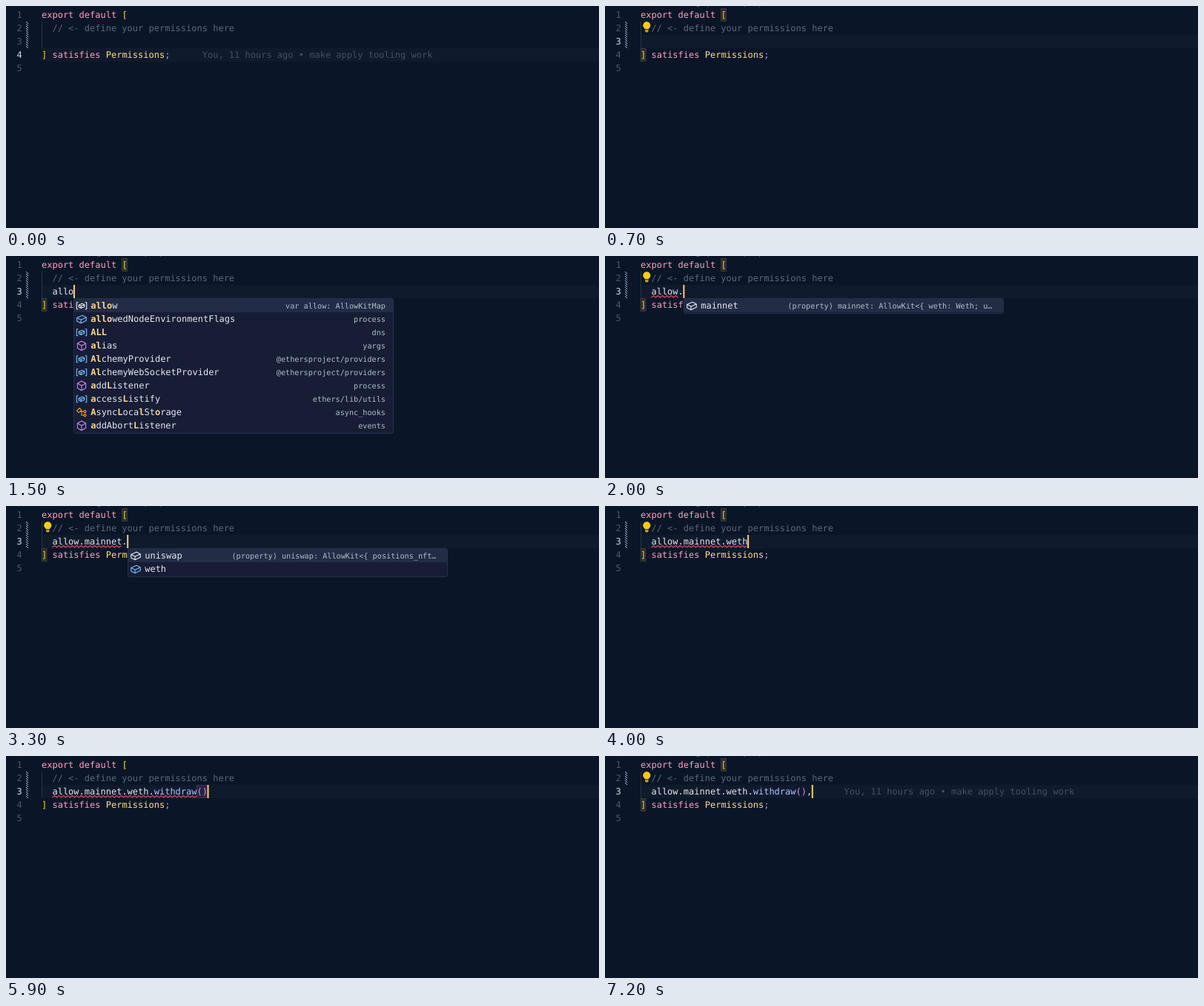
Recreate the animation shown at these times as an HTML page. Size 800 by 300 pixels, loop 7500 ms.

```html
<!DOCTYPE html>
<html lang="en">
<head>
<meta charset="utf-8">
<title>Typing permissions</title>
<style>
html, body { margin: 0; width: 100%; height: 100%; overflow: hidden; background: #0a1628; }
svg { display: block; width: 800px; height: 300px; }
text { font: 12px "DejaVu Sans Mono", Menlo, monospace; white-space: pre; text-rendering: geometricPrecision; }
.detail { font-size: 10.2px; fill: #b3bac8; }
.lens { font: 10.8px "Liberation Sans", Arial, sans-serif; fill: #5a6478; }
.hit { fill: #ffd58a; font-weight: bold; }
.icon { fill: none; stroke-width: 1.1; stroke-linejoin: round; }
</style>
</head>
<body>
<svg viewBox="0 0 800 300">
  <defs>
    <pattern id="hatch" width="3" height="3" patternUnits="userSpaceOnUse">
      <path d="M-1 -1L4 4M-1 2L1 4M2 -1L4 1" stroke="#a9c3e6" stroke-width="1"/>
    </pattern>
  </defs>
  <rect width="800" height="300" fill="#0a1628"/>
  <g id="view"></g>
</svg>
<script>
(() => {
const LOOP = 7500, CW = 7.224, LEFT = 48, INDENT = LEFT + 2 * CW, ROW = 18;
const PINK = '#ff9fbe', GOLD = '#ffd52e', TYPE = '#ffdd8c', PLAIN = '#e3e7ef',
      CALL = '#a9c5ff', PURPLE = '#cf8fe8', GREY = '#5d6678', DIM = '#454f61', ERR = '#e2455f';
const view = document.getElementById('view');

// Completion lists: [icon, label, detail]
const GLOBALS = [
  ['var', 'allow', 'var allow: AllowKitMap'],
  ['method', 'alias', 'yargs'],
  ['field', 'allowedNodeEnvironmentFlags', 'process'],
  ['var', 'AlchemyProvider', '@ethersproject/providers'],
  ['var', 'AlchemyWebSocketProvider', '@ethersproject/providers'],
  ['var', 'ALL', 'dns'],
  ['method', 'addListener', 'process'],
  ['var', 'accessListify', 'ethers/lib/utils'],
  ['class', 'AsyncLocalStorage', 'async_hooks'],
  ['method', 'addAbortListener', 'events'],
  ['method', 'addAbortListener', 'stream'],
  ['var', 'applyAnnotations', 'zodiac-roles-sdk/.']
];
const NARROWED = [0, 2, 5, 1, 3, 4, 6, 7, 8, 9, 10, 11].map(i => GLOBALS[i]);
const CHAINS = [['field', 'mainnet', '(property) mainnet: AllowKit<{ weth: Weth; u…']];
const UNISWAP = ['field', 'uniswap', '(property) uniswap: AllowKit<{ positions_nft…'];
const WETH = ['field', 'weth', '(property) weth: AllowKit<{ weth: Weth; }>'];
const METHODS = [
  ['var', 'EVERYTHING', 'node_modules/zodiac-roles-sdk/build/cjs/sdk/…'],
  ...'allowance approve balanceOf decimals deposit name symbol totalSupply transfer transferFrom'
    .split(' ').map(name => ['method', name]),
  ['method', 'withdraw']
];
const WITHDRAW = ['method', 'withdraw', '(method) withdraw(options?: …'];

const menu = (items, typed = '', bar = false) => ({ items, typed, bar });

// Each step changes some fields of the editor state
const steps = [
  [0, { line: 4, code: '', back: 0, cursor: 0, blame: 4, pair: '', lens: 0, bulb: 0,
        menu: null, wave: 0, endWave: 0, dirty: 2 }],
  [200, { line: 3, blame: 0, cursor: 1, pair: '[]' }],
  [300, { lens: 1 }],
  [400, { bulb: 1 }],
  [700, { cursor: 0 }],
  [900, { code: 'a', cursor: 1, bulb: 0 }],
  [1000, { menu: menu(GLOBALS, 'a', true) }],
  [1100, { code: 'al', menu: menu(GLOBALS, 'al', true), bulb: 1 }],
  [1200, { bulb: 0 }],
  [1300, { code: 'all', menu: menu(NARROWED, 'all', true) }],
  [1400, { code: 'allo', menu: menu(NARROWED, 'allo', true) }],
  [1500, { menu: menu(NARROWED.slice(0, 10), 'allo') }],
  [1700, { code: 'allow', menu: null }],
  [1800, { wave: 5, bulb: 1 }],
  [2000, { code: 'allow.', menu: menu(CHAINS) }],
  [2300, { code: 'allow.m', menu: menu(CHAINS, 'm'), bulb: 0 }],
  [2600, { code: 'allow.mainnet', menu: null, wave: 13 }],
  [2900, { code: 'allow.mainnet.' }],
  [3000, { menu: menu([UNISWAP, WETH]) }],
  [3300, { bulb: 1 }],
  [3400, { code: 'allow.mainnet.w', menu: menu([WETH, UNISWAP], 'w') }],
  [3500, { bulb: 0 }],
  [3600, { endWave: 1 }],
  [3800, { code: 'allow.mainnet.weth', menu: null }],
  [3900, { endWave: 0 }],
  [4000, { wave: 18, bulb: 1 }],
  [4300, { code: 'allow.mainnet.weth.' }],
  [4400, { menu: menu(METHODS) }],
  [4500, { wave: 0 }],
  [4700, { endWave: 1 }],
  [4800, { cursor: 0, lens: 0 }],
  [5000, { code: 'allow.mainnet.weth.w', menu: menu([WITHDRAW, METHODS[1]], 'w'), cursor: 1, bulb: 0 }],
  [5100, { code: 'allow.mainnet.weth.wi', menu: menu([WITHDRAW], 'wi') }],
  [5400, { code: 'allow.mainnet.weth.withdraw', menu: null, endWave: 0 }],
  [5500, { wave: 27, bulb: 1 }],
  [5800, { code: 'allow.mainnet.weth.withdraw()', back: 1, pair: '()', bulb: 0 }],
  [5900, { back: 0 }],
  [6200, { code: 'allow.mainnet.weth.withdraw(),', pair: '[]' }],
  [6300, { dirty: 1 }],
  [6400, { wave: 0 }],
  [6800, { bulb: 1, lens: 1 }],
  [6900, { blame: 3 }],
  [7000, { cursor: 0 }],
  [7200, { cursor: 1 }]
];

const esc = s => s.replace(/&/g, '&amp;').replace(/</g, '&lt;');
const span = (s, fill) => `<tspan fill="${fill}">${esc(s)}</tspan>`;
const text = (x, y, body, attrs = '') => `<text x="${x}" y="${y}" ${attrs}>${body}</text>`;
const rect = (x, y, w, h, fill, more = '') =>
  `<rect x="${x}" y="${y}" width="${w}" height="${h}" fill="${fill}" ${more}/>`;
const baseline = line => 16.3 + (line - 1) * ROW;
const rowTop = line => 3 + (line - 1) * ROW;

function wave(x, y, width) {
  let d = `M${x} ${y + 1.5}`;
  for (let i = 3; i <= width; i += 3) d += `L${x + i} ${y + (i % 2 ? -1 : 1.5)}`;
  return `<path d="${d}" fill="none" stroke="${ERR}" stroke-width="1.1"/>`;
}

function pairBox(x, line) {
  return rect(x + .3, rowTop(line) + .5, CW - .6, ROW - 1, '#292c30', 'stroke="#454436" stroke-width=".8"');
}

const shapes = {
  method: ['#c58be8', 'M0 -6.2L5.6 -3.2V3.2L0 6.4L-5.6 3.2V-3.2ZM-5.6 -3.2L0 0L5.6 -3.2M0 0V6.4'],
  field: ['#75beff', 'M1 -5L6.3 -2.4V2L-1 5.4L-6.3 2.6V-1.8ZM-6.3 -1.8L-1 .9L6.3 -2.4M-1 .9V5.4'],
  var: ['#75beff', 'M-4.6 -4.5H-6.7V4.5H-4.6M4.6 -4.5H6.7V4.5H4.6M.8 -3L3.8 -1.5V1.2L-.8 3.2L-3.8 1.6V-1ZM-3.8 -1L-.8 .5L3.8 -1.5M-.8 .5V3.2'],
  class: ['#ee9d28', 'M-6.5 -2.2L-2.8 -5.8L-.2 -3.2L-3.8 .4ZM-2 -1.2H2.5M0 -1.2V4H2.5M4.5 -3L6.4 -1.1L4.5 .8L2.6 -1.1ZM4.5 2L6.4 3.9L4.5 5.8L2.6 3.9Z']
};
function icon(kind, x, y, active) {
  const [color, d] = shapes[kind];
  return `<path class="icon" transform="translate(${x} ${y})" d="${d}" stroke="${active ? '#e8ecf4' : color}"/>`;
}

// Bold the typed letters: as a prefix, or preferring capitals further on
function marked(label, typed) {
  const low = label.toLowerCase(), hits = new Set();
  const prefix = low.startsWith(typed);
  let from = 0;
  for (const c of typed) {
    const cap = prefix ? -1 : label.indexOf(c.toUpperCase(), from);
    const at = cap >= 0 && from > 0 ? cap : low.indexOf(c, from);
    if (at < 0) break;
    hits.add(at);
    from = at + 1;
  }
  return [...label].map((c, i) => hits.has(i) ? `<tspan class="hit">${c}</tspan>` : c).join('');
}

function drawMenu({ items, typed, bar }, x) {
  const h = items.length * ROW + 2, global = items[0][1] === 'allow';
  let out = rect(x + .5, 57.5, 431, h, '#161d35', 'rx="2" stroke="#262f49"');
  out += rect(x + 1, 58, 430, ROW, '#232c45');
  if (bar) out += rect(x + 422, 58, 9, 40, '#2b344e');
  items.forEach(([kind, label, detail], i) => {
    const y = 67 + i * ROW;
    out += icon(kind, x + 11, y + .3, i === 0);
    out += text(x + 23.2, y + 4.3, marked(label, typed), `fill="${PLAIN}"`);
    if (detail && (i === 0 || global))
      out += text(x + (global ? 421 : 416.5), y + 3.8, esc(detail), 'class="detail" text-anchor="end"');
  });
  return out;
}

const bulb = `<path d="M53.8 31.2C53.6 29.6 51.2 29 51.2 26.4A5.1 5.1 0 0 1 61.4 26.4C61.4 29 59 29.6 58.8 31.2Z" fill="#ffcc12"/>
  <path d="M54 32.3H58.6V34L57.6 35.5H55L54 34Z" fill="#c9a21c"/>`;

function codeSpans(code) {
  const m = code.match(/^(.*\.)(withdraw)(\(\))(,?)$/);
  if (!m) return span(code, PLAIN);
  return span(m[1], PLAIN) + span(m[2], CALL) + span(m[3], PURPLE) + span(m[4], PLAIN);
}

function draw(s) {
  const end = INDENT + s.code.length * CW, caret = end - s.back * CW;
  let out = rect(LEFT, rowTop(s.line), 752, ROW, '#101a2d');
  out += rect(48, rowTop(2), 1, 2 * ROW, '#29334a');
  out += rect(27, rowTop(2), 3, s.dirty * ROW, 'url(#hatch)');
  for (let n = 1; n <= 5; n++)
    out += text(14.6, baseline(n), n, `fill="${n === s.line ? '#d3d8e2' : '#4c5769'}"`);

  if (s.pair === '[]') out += pairBox(LEFT + 15 * CW, 1) + pairBox(LEFT, 4);
  if (s.pair === '()')
    out += rect(INDENT + 27 * CW, rowTop(3) + .5, 2 * CW, ROW - 1, '#2a2540', 'stroke="#443852" stroke-width=".8"');

  if (s.lens) out += text(LEFT, -1.2, 'You, 11 hours ago | 1 author (You)', 'class="lens"');
  out += text(LEFT, baseline(1), span('export default ', PINK) + span('[', GOLD));
  out += text(INDENT, baseline(2), span('// <- define your permissions here', GREY));
  out += text(INDENT, baseline(3), codeSpans(s.code));
  out += text(LEFT, baseline(4),
    span('] ', GOLD) + span('satisfies ', PINK) + span('Permissions', TYPE) + span(';', PURPLE));

  if (s.blame) {
    const x = (s.blame === 4 ? LEFT + 24 * CW : end) + 6 * CW;
    out += text(x, baseline(s.blame), span('You, 11 hours ago • make apply tooling work', DIM));
  }
  if (s.wave) out += wave(INDENT, 54.5, s.wave * CW);
  if (s.endWave) out += wave(LEFT, 72.5, CW);
  if (s.bulb) out += bulb;
  if (s.cursor) out += rect(caret - .4, rowTop(3), 2, ROW, '#ffcb6b');
  if (s.menu) out += drawMenu(s.menu, Math.round(caret));
  view.innerHTML = out;
}

const states = [];
steps.reduce((prev, [at, change]) => {
  const next = { ...prev, ...change };
  states.push({ at, ...next });
  return next;
}, {});

const start = performance.now();
let shown = null;
function tick() {
  const t = (performance.now() - start) % LOOP;
  const now = states.findLast(s => s.at <= t) || states[0];
  if (now !== shown) draw(shown = now);
  requestAnimationFrame(tick);
}
tick();
})();
</script>
</body>
</html>
```
